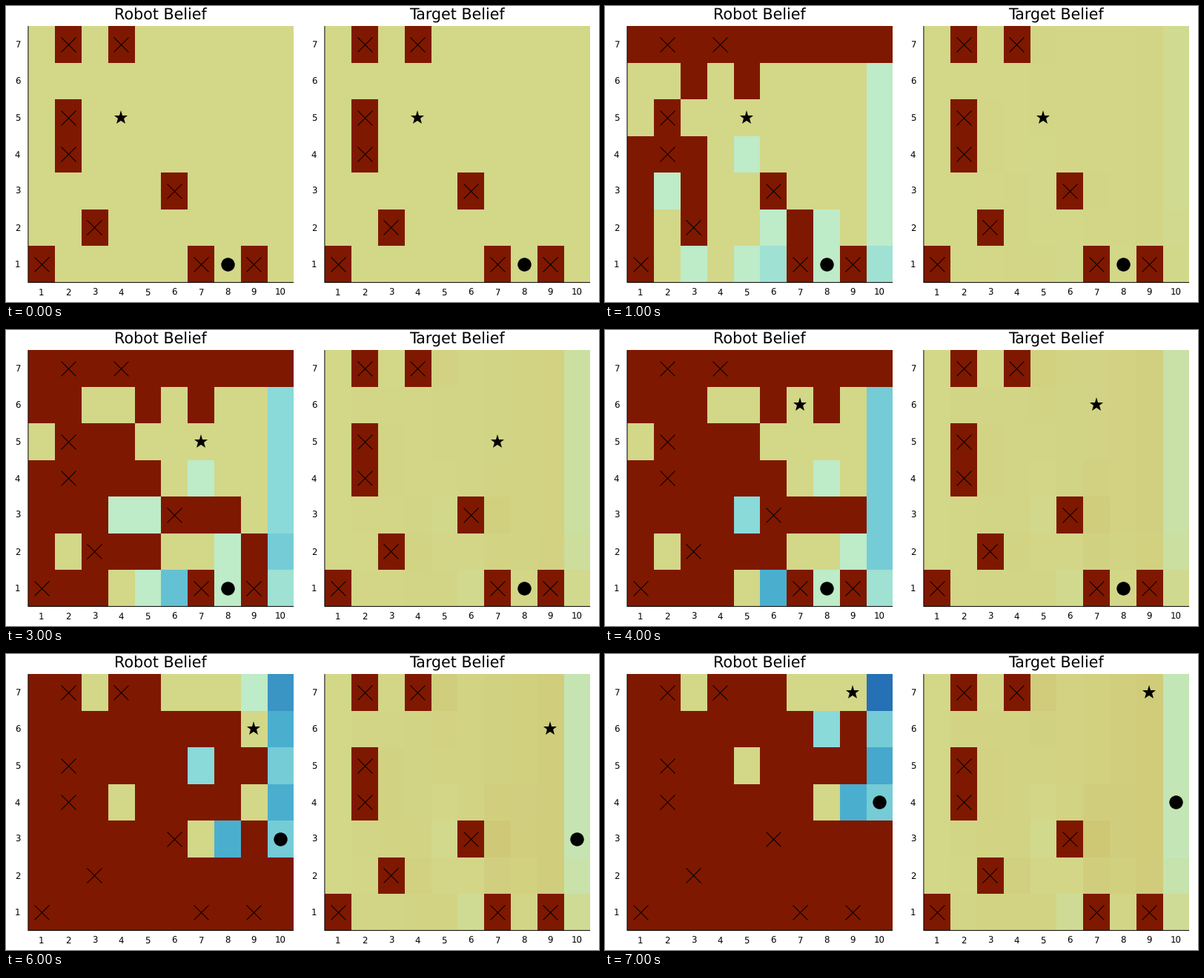
A matplotlib script for the animation above (8000 ms loop, 800 by 400 pixels).

```python
import numpy as np
import matplotlib.pyplot as plt
from matplotlib.animation import FuncAnimation
from matplotlib.colors import to_rgb

COLS, ROWS, STEPS = 10, 7, 8
TOP, BOTTOM, WIDTH = 27.1, 373.6, 358.2
CELL_W, CELL_H = WIDTH / COLS, (BOTTOM - TOP) / ROWS
LEFTS = (29.9, 429.9)
PX = 0.72  # points per pixel at 100 dpi

E, N, NE, SE = (1, 0), (0, 1), (1, 1), (1, -1)
BLOCKED = [(1, 1), (2, 4), (2, 5), (2, 7), (3, 2), (4, 7), (6, 3), (7, 1), (9, 1)]
WINDS = [SE] + [E] * 3 + [NE] * 3
ROBOT_MOVES = [E, E, E, N, E, E, N]
SPREAD = {E: .6, NE: .2, SE: .2}

# Colours at log2 of the mass, relative to the uniform belief.
EMPTY = to_rgb("#7f1800")
STOPS = {-1: "#c7ad54", 0: "#d3d788", 1: "#beebc8", 2: "#89dad9",
         3: "#4aafcf", 4.585: "#2671b5"}
SHADES = np.array([to_rgb(c) for c in STOPS.values()])


def colour(mass):
    level = np.log2(np.maximum(mass, 1e-9))
    rgb = np.stack([np.interp(level, list(STOPS), s) for s in SHADES.T], axis=-1)
    rgb[mass == 0] = EMPTY
    return rgb


def move(cell, wind):
    """Drift one cell; walls slide, obstacles hold."""
    x = min(max(cell[0] + wind[0], 1), COLS)
    y = min(max(cell[1] + wind[1], 1), ROWS)
    return cell if (x, y) in BLOCKED else (x, y)


def drift(mass, winds, rate):
    """Move a share of each cell's mass, split over weighted winds."""
    moved = mass * rate
    out = mass - moved
    for (j, i), m in np.ndenumerate(moved):
        for wind, weight in winds.items():
            x, y = move((i + 1, j + 1), wind)
            out[y - 1, x - 1] += m * weight
    return out


start = np.ones((ROWS, COLS))
for x, y in BLOCKED:
    start[y - 1, x - 1] = 0

# The slow drift of the second belief quickens towards the east.
u = np.linspace(0, 1, COLS)
slow = .06 * u + .08 * u ** 4

beliefs = [[start], [start]]
robot, target = [(4, 5)], [(8, 1)]
for wind, step in zip(WINDS, ROBOT_MOVES):
    beliefs[0].append(drift(beliefs[0][-1], {wind: 1}, 1))
    beliefs[1].append(drift(beliefs[1][-1], SPREAD, slow))
    robot.append((robot[-1][0] + step[0], robot[-1][1] + step[1]))
    target.append(move(target[-1], wind))

plt.rcParams["font.family"] = "DejaVu Sans"
plt.rcParams["text.hinting"] = "none"
fig = plt.figure(figsize=(8, 4), dpi=100, facecolor="white")
ax = fig.add_axes([0, 0, 1, 1])
ax.axis("off")


def centre(left, cell):
    return left + (cell[0] - .5) * CELL_W, BOTTOM - (cell[1] - .5) * CELL_H


def marker(shape, size, edge=0):
    return ax.plot([], [], shape, color="black", ms=size * PX, mew=edge * PX,
                   ls="none", zorder=4, snap=False)[0]


def label(x, y, text, size=11.7, ha="center"):
    ax.text(x, y, text, size=size * PX, ha=ha, va="baseline")


def panel(left, title):
    # Cells sit on whole pixels.
    xs = np.round(left + .35 + CELL_W * np.arange(COLS + 1))
    ys = np.round(BOTTOM - CELL_H * np.arange(ROWS + 1))
    mesh = ax.pcolormesh(xs, ys, colour(start), antialiased=False)
    ax.plot([left, left, left + WIDTH], [TOP, BOTTOM, BOTTOM], color="black",
            lw=PX, zorder=3, snap=False, solid_capstyle="butt")
    label(left + WIDTH / 2 - .4, 18.5, title, 20.6)
    for x in range(1, COLS + 1):
        label(centre(left, (x, 1))[0], 391.3, str(x))
    for y in range(1, ROWS + 1):
        label(left - 10.7, centre(left, (1, y))[1] + 4.3, str(y), ha="right")
    crosses = marker("x", 20, 1)
    crosses.set_data(*zip(*(centre(left, c) for c in BLOCKED)))
    return mesh, marker("*", 19.4), marker("o", 18.4)


panels = [panel(LEFTS[0], "Robot Belief"), panel(LEFTS[1], "Target Belief")]
ax.set(xlim=(0, 800), ylim=(400, 0))


def draw(step):
    artists = []
    for left, belief, (mesh, star, dot) in zip(LEFTS, beliefs, panels):
        mesh.set_array(colour(belief[step]))
        for mark, cell in ((star, robot[step]), (dot, target[step])):
            x, y = centre(left, cell)
            mark.set_data([x], [y])
        artists += [mesh, star, dot]
    return artists


anim = FuncAnimation(fig, draw, frames=STEPS, interval=1000, repeat=True,
                     repeat_delay=0, blit=False)
plt.show()
```
